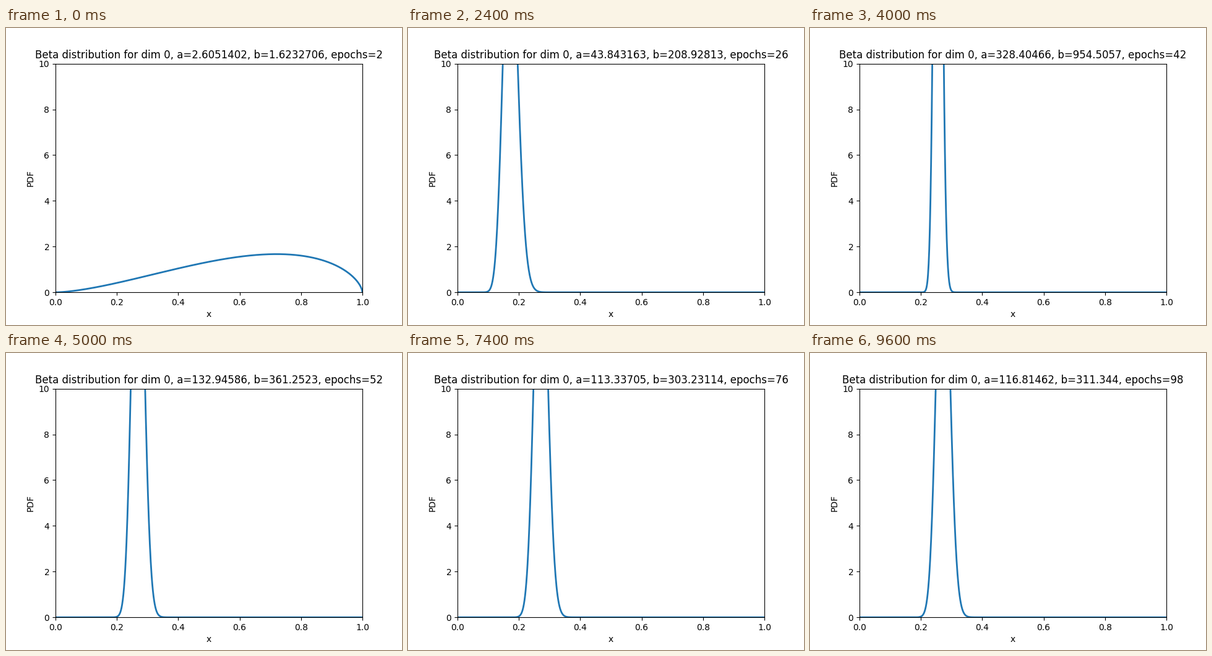
A matplotlib script for the animation above (9.8 s loop, 640 by 480 pixels).

```python
from itertools import pairwise
from math import lgamma

import matplotlib.pyplot as plt
import numpy as np
from matplotlib.animation import FuncAnimation

FRAMES = 49
INTERVAL = 200
EPOCHS_PER_FRAME = 2

# Key points of the training run: epoch, a, b
KEYS = [
    (2, 2.6051402, 1.6232706),    # broad start
    (16, 1.0454217, 17.965513),   # collapses towards zero
    (34, 109.97998, 382.1976),    # moves right and narrows
    (42, 328.40466, 954.5057),    # sharpest peak
    (62, 98.347496, 261.30917),   # relaxes
    (76, 113.33705, 303.23114),   # settles
    (98, 116.81462, 311.344),
]

x = np.linspace(0, 1, 1000)


def ease_out(t):
    return 1 - (1 - t) ** 2


def params(epoch):
    """Shape parameters, eased geometrically between key points."""
    for (e0, *start), (e1, *end) in pairwise(KEYS):
        if epoch < e1:
            break
    u = ease_out((epoch - e0) / (e1 - e0))
    return [np.float32(p * (q / p) ** u) for p, q in zip(start, end)]


def beta_pdf(a, b):
    a, b = float(a), float(b)
    norm = lgamma(a + b) - lgamma(a) - lgamma(b)
    with np.errstate(divide="ignore"):
        return np.exp(norm + (a - 1) * np.log(x) + (b - 1) * np.log1p(-x))


fig, ax = plt.subplots(figsize=(6.4, 4.8), dpi=100)
line, = ax.plot([], [], lw=2)
ax.set(xlim=(0, 1), ylim=(0, 10), xlabel="x", ylabel="PDF")
title = ax.set_title("")


def update(i):
    epoch = EPOCHS_PER_FRAME * (i + 1)
    a, b = params(epoch)
    line.set_data(x, beta_pdf(a, b))
    title.set_text(f"Beta distribution for dim 0, a={str(a)}, b={str(b)}, epochs={epoch}")
    return line, title


anim = FuncAnimation(fig, update, frames=FRAMES, interval=INTERVAL,
                     repeat=True, repeat_delay=0, blit=False)
plt.show()
```
